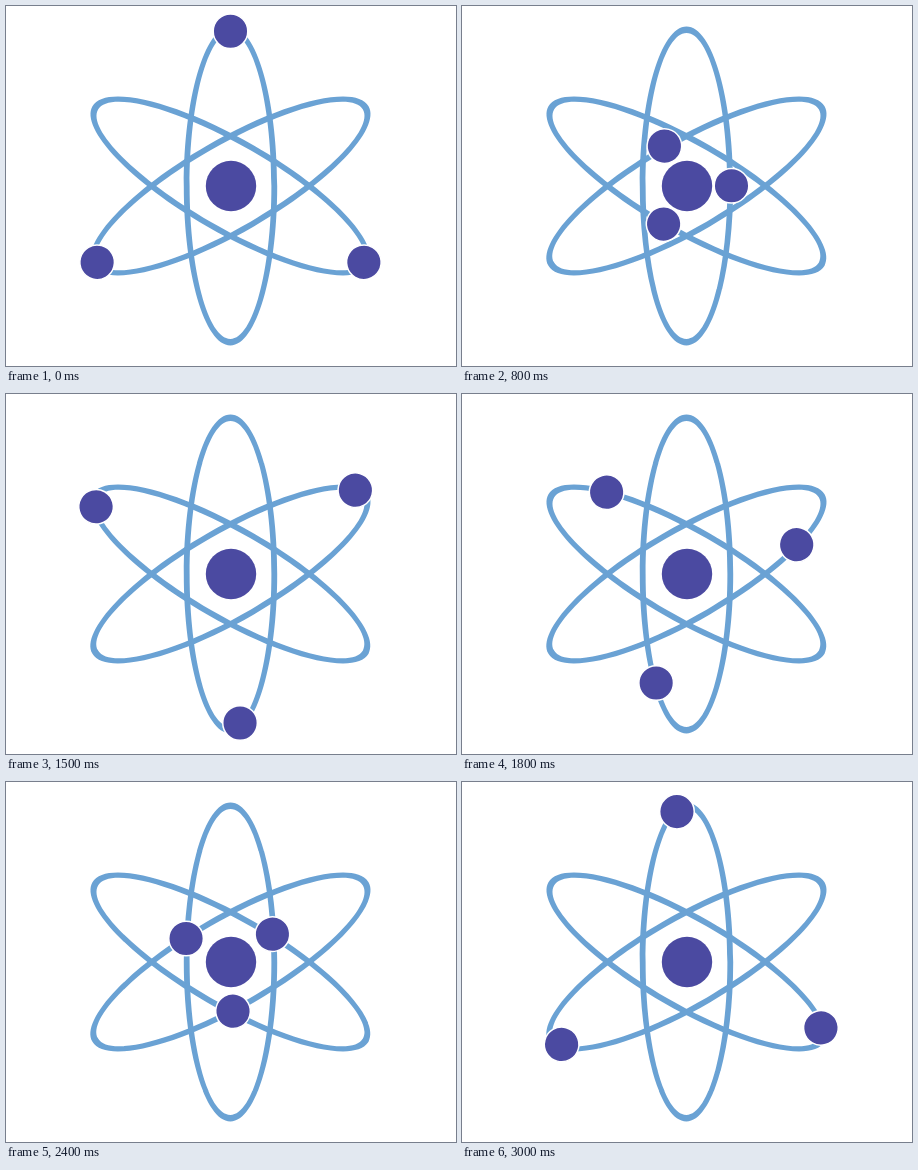
These frames come from a looping animation (450 px wide and 360 px high, 3100 ms). An HTML page:

```html
<!DOCTYPE html>
<html lang="en">
<head>
<meta charset="utf-8">
<title>Atom</title>
<style>
  html, body { margin: 0; width: 100%; height: 100%; overflow: hidden; background: #fff; }
  svg { display: block; width: 450px; height: 360px; }
  .ring { fill: #6aa2d4; fill-rule: evenodd; }
  .ball { fill: #4b4aa1; }
  .electron { stroke: #fff; stroke-width: 1.5; }
</style>
</head>
<body>
<svg viewBox="0 0 450 360">
  <g id="rings" transform="translate(224.5 180)"></g>
  <circle class="ball" cx="225" cy="180" r="25.2"/>
  <g id="electrons" transform="translate(224.5 179.3)"></g>
</svg>
<script>
const NS = 'http://www.w3.org/2000/svg';
const STEP = 100, LOOP = 3100;
const STEPS_PER_LAP = 30, LAG = 0.48;
const TILTS = [0, 120, 240];

function add(parent, tag, attrs) {
  const el = document.createElementNS(NS, tag);
  for (const name in attrs) el.setAttribute(name, attrs[name]);
  return document.getElementById(parent).appendChild(el);
}

// Clockwise oval from its top; a smaller tip value gives more pointed ends
function oval(rx, ry, tip = 0.552) {
  const hx = rx * tip, hy = ry * 0.552;
  return `M0 ${-ry}C${hx} ${-ry} ${rx} ${-hy} ${rx} 0S${hx} ${ry} 0 ${ry}` +
    `S${-rx} ${hy} ${-rx} 0S${-hx} ${-ry} 0 ${-ry}Z`;
}

for (const tilt of TILTS) {
  add('rings', 'path', {
    class: 'ring',
    d: oval(46.7, 159.4) + oval(40.9, 152.9),
    transform: `rotate(${tilt})`
  });
}

const orbit = add('electrons', 'path', { d: oval(45, 154, 0.48), fill: 'none' });
const lap = orbit.getTotalLength();
const electrons = TILTS.map(() =>
  add('electrons', 'circle', { class: 'ball electron', r: 17.3 }));

// Constant speed along the orbit; the first step is shorter
function draw(time) {
  const step = Math.floor((time % LOOP) / STEP);
  const turn = Math.max(0, step - LAG) / STEPS_PER_LAP;
  const { x, y } = orbit.getPointAtLength(turn * lap);
  electrons.forEach((el, i) =>
    el.setAttribute('transform', `rotate(${TILTS[i]}) translate(${x} ${y})`));
}

const start = performance.now();
function tick() {
  draw(performance.now() - start);
  requestAnimationFrame(tick);
}
tick();
</script>
</body>
</html>
```
